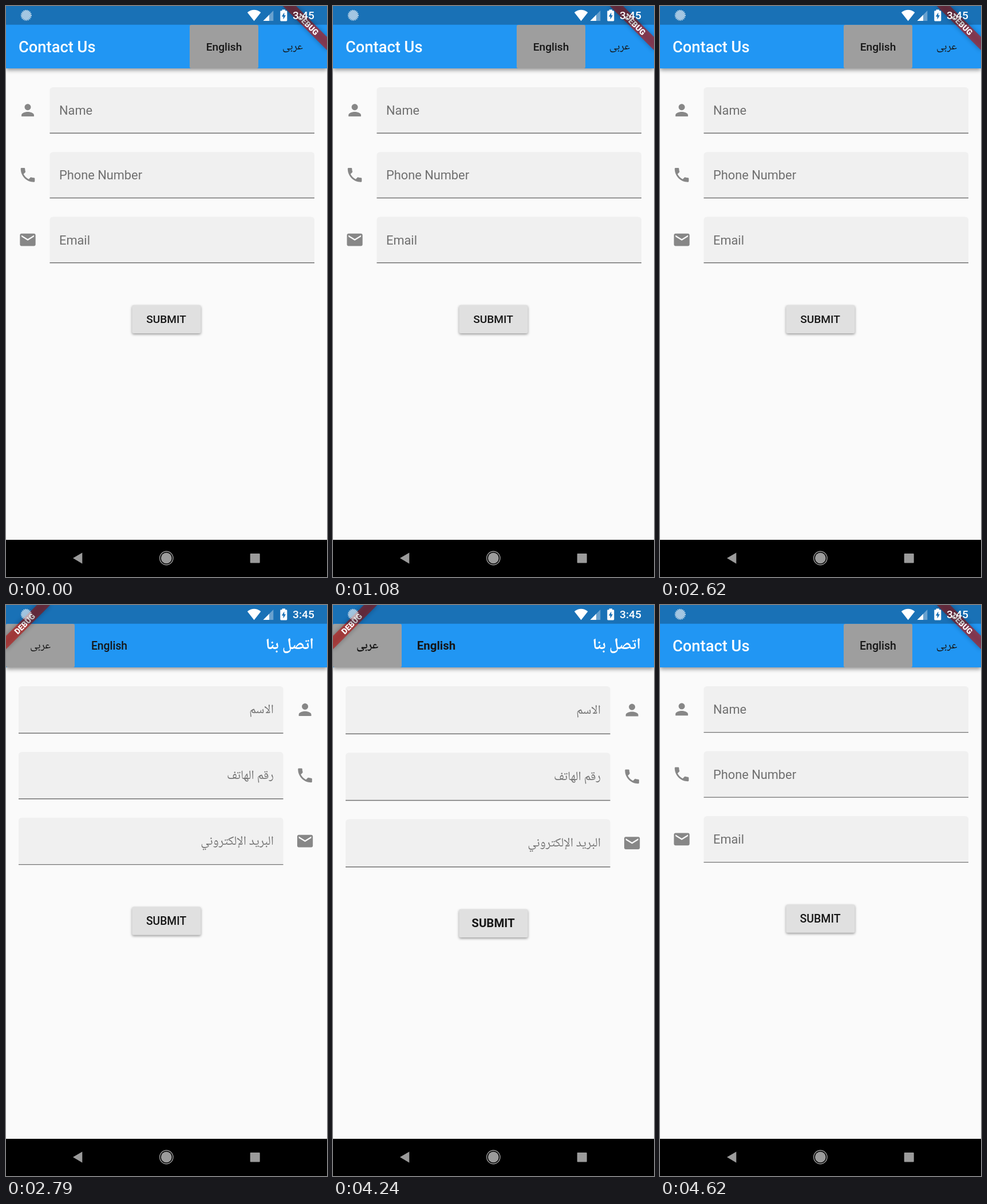
Animation of 561 by 998 pixels, one loop 6150 ms. Source, as an HTML page with a canvas:

```html
<!DOCTYPE html>
<html lang="en">
<head>
<meta charset="utf-8">
<title>Contact form</title>
<style>
html, body { margin: 0; width: 100%; height: 100%; overflow: hidden; background: #fafafa; }
canvas { display: block; width: 561px; height: 998px; }
</style>
</head>
<body>
<canvas id="stage" width="561" height="998"></canvas>
<script>
const ctx = document.getElementById('stage').getContext('2d');
const W = 561, H = 998, DP = 1.365, LOOP = 6150;
const LATIN = 'Roboto, sans-serif';
const ARABIC = '"Noto Naskh Arabic UI", "Noto Naskh Arabic", "Noto Sans Arabic", "DejaVu Sans", sans-serif';

const ICONS = [
  'M12 12c2.21 0 4-1.79 4-4s-1.79-4-4-4-4 1.79-4 4 1.79 4 4 4zm0 2c-2.67 0-8 1.34-8 4v2h16v-2c0-2.66-5.33-4-8-4z',
  'M6.62 10.79c1.44 2.83 3.76 5.14 6.59 6.59l2.2-2.2c.27-.27.67-.36 1.02-.24 1.12.37 2.33.57 3.57.57.55 0 1 .45 1 1V20c0 .55-.45 1-1 1-9.39 0-17-7.61-17-17 0-.55.45-1 1-1h3.5c.55 0 1 .45 1 1 0 1.25.2 2.45.57 3.57.11.35.03.74-.25 1.02l-2.2 2.2z',
  'M20 4H4c-1.1 0-1.99.9-1.99 2L2 18c0 1.1.9 2 2 2h16c1.1 0 2-.9 2-2V6c0-1.1-.9-2-2-2zm0 4l-8 5-8-5V6l8 5 8-5v2z'
].map(d => new Path2D(d));

const HINTS = {
  en: ['Name', 'Phone Number', 'Email'],
  ar: ['الاسم', 'رقم الهاتف', 'البريد الإلكتروني']
};

const mix = (a, b, k) => a + (b - a) * k;
const ramp = (t, a, b) => Math.min(1, Math.max(0, (t - a) / (b - a)));

function text(str, x, y, size, o = {}) {
  ctx.font = `${o.weight || 400} ${size}px ${o.font || LATIN}`;
  ctx.textAlign = o.align || 'left';
  ctx.direction = o.font === ARABIC ? 'rtl' : 'ltr';
  ctx.fillStyle = o.color || '#fff';
  ctx.fillText(str, x, y);
}

function box(x, y, w, h, color, radius = 0) {
  ctx.fillStyle = color;
  ctx.beginPath();
  ctx.roundRect(x, y, w, h, radius);
  ctx.fill();
}

function poly(color, ...pts) {
  ctx.fillStyle = color;
  ctx.beginPath();
  pts.forEach(([x, y]) => ctx.lineTo(x, y));
  ctx.closePath();
  ctx.fill();
}

function disc(x, y, r, color) {
  ctx.fillStyle = color;
  ctx.beginPath();
  ctx.arc(x, y, r, 0, Math.PI * 2);
  ctx.fill();
}

function shadow(color, blur, dy) {
  ctx.shadowColor = color;
  ctx.shadowBlur = blur;
  ctx.shadowOffsetY = dy;
}

function appBar(rtl, size, weight) {
  ctx.save();
  shadow('rgba(0,0,0,.42)', 7, 3);
  box(0, 0, W, 109, '#2196f3');
  ctx.restore();
  box(rtl ? 0 : 321, 33, 120, 76, '#9e9e9e', 2.7);
  const label = { weight, align: 'center', color: '#161616' };
  text('English', rtl ? 180.5 : 381, 78, size, label);
  text('عربى', rtl ? 60 : 501, 76, size, { ...label, font: ARABIC });
  if (rtl) text('اتصل بنا', 538, 77, 27.3, { weight: 700, align: 'right', font: ARABIC });
  else text('Contact Us', 22, 81, 27.3, { weight: 500 });
}

// Lays out the three fields and returns the bottom edge of the last one.
function fields(rtl, k) {
  const h = rtl ? mix(82.4, 84, k) : mix(81, 82, k);
  const pitch = h + 32.2, x = rtl ? 22 : 76.5;
  HINTS[rtl ? 'ar' : 'en'].forEach((hint, i) => {
    const y = 142 + i * pitch, mid = y + h / 2 - .3;
    box(x, y, 462.5, h, '#f0f0f0', [5.5, 5.5, 0, 0]);
    box(x, y + h - 1.4, 462.5, 1.4, '#737373');
    ctx.save();
    ctx.translate((rtl ? 522.6 : 38) - 12 * DP, mid - 12 * DP);
    ctx.scale(DP, DP);
    ctx.fillStyle = '#878787';
    ctx.fill(ICONS[i]);
    ctx.restore();
    if (rtl) text(hint, 468, mid + 6, 22, { align: 'right', color: '#737373', font: ARABIC });
    else text(hint, 93, mid + 8, 21.8, { color: '#707070' });
  });
  return 142 + 2 * pitch + h;
}

function submit(y, size, weight) {
  ctx.save();
  shadow('rgba(0,0,0,.38)', 4, 2);
  box(220.3, y, 120.3, 49.2, '#e0e0e0', 2.7);
  ctx.restore();
  text('SUBMIT', rtlMid, y + 31.6, size, { weight, align: 'center', color: '#161616' });
}
const rtlMid = 280;

function banner(rtl) {
  ctx.save();
  ctx.translate(rtl ? 0 : W, 0);
  ctx.rotate(rtl ? -Math.PI / 4 : Math.PI / 4);
  ctx.save();
  shadow('rgba(0,0,0,.45)', 8, 0);
  box(-54.6, 38.2, 109.2, 16.4, 'rgba(183,28,28,.66)');
  ctx.restore();
  text('DEBUG', 0, 51.3, 13.9, { weight: 900, align: 'center' });
  ctx.restore();
}

function statusBar() {
  box(0, 0, W, 32.8, 'rgba(0,0,0,.25)');
  disc(35.3, 16.3, 8.2, 'rgba(255,255,255,.6)');
  ctx.strokeStyle = 'rgba(255,255,255,.8)';
  ctx.lineWidth = 1.4;
  ctx.setLineDash([1.6, 1.4]);
  ctx.beginPath();
  ctx.arc(35.3, 16.3, 8.8, 0, Math.PI * 2);
  ctx.stroke();
  ctx.setLineDash([]);

  ctx.fillStyle = '#fff';
  ctx.beginPath();
  ctx.moveTo(433.6, 26.3);
  ctx.lineTo(421.8, 11.3);
  ctx.quadraticCurveTo(433.6, 2.4, 445.4, 11.3);
  ctx.fill();

  poly('rgba(255,255,255,.35)', [449.5, 26], [467.3, 26], [467.3, 8]);
  poly('#fff', [449.5, 26], [460, 26], [460, 15.4]);

  box(479.3, 8.3, 12, 18.2, '#fff', 1.4);
  box(482.6, 6.3, 5.4, 3, '#fff');
  poly('#1971b6', [486.3, 11.2], [481.8, 18.4], [484.6, 18.4], [484.6, 23.6], [489, 16.3], [486.3, 16.3]);
  text('3:45', 501, 23.4, 19.2, { weight: 500 });
}

function navBar() {
  const grey = '#9b9b9b';
  box(0, 933, W, 65, '#000');
  poly(grey, [117, 965], [133.3, 955.5], [133.3, 974.8]);
  disc(280.3, 965, 9.4, grey);
  ctx.strokeStyle = grey;
  ctx.lineWidth = 1.4;
  ctx.beginPath();
  ctx.arc(280.3, 965, 11.7, 0, Math.PI * 2);
  ctx.stroke();
  box(426.7, 957, 17, 16.6, grey, 1);
}

// k is the progress of the label style: 0 regular script, 1 tall script.
function styleAt(t) {
  if (t < 2760) return 0;
  if (t < 4240) return .7 * ramp(t, 2760, 2910);
  if (t < 4470) return 1;
  return mix(1, .3, ramp(t, 4470, 4620));
}

function draw(t) {
  const rtl = t >= 2760 && t < 4470;
  const k = styleAt(t);
  const size = mix(14, 15, k) * DP;
  const weight = k < .75 ? 500 : 700;
  box(0, 0, W, H, '#fafafa');
  submit(fields(rtl, k) + 73.3, size, weight);
  appBar(rtl, size, weight);
  banner(rtl);
  statusBar();
  navBar();
}

function tick() {
  draw(performance.now() % LOOP);
  requestAnimationFrame(tick);
}
tick();
</script>
</body>
</html>
```
